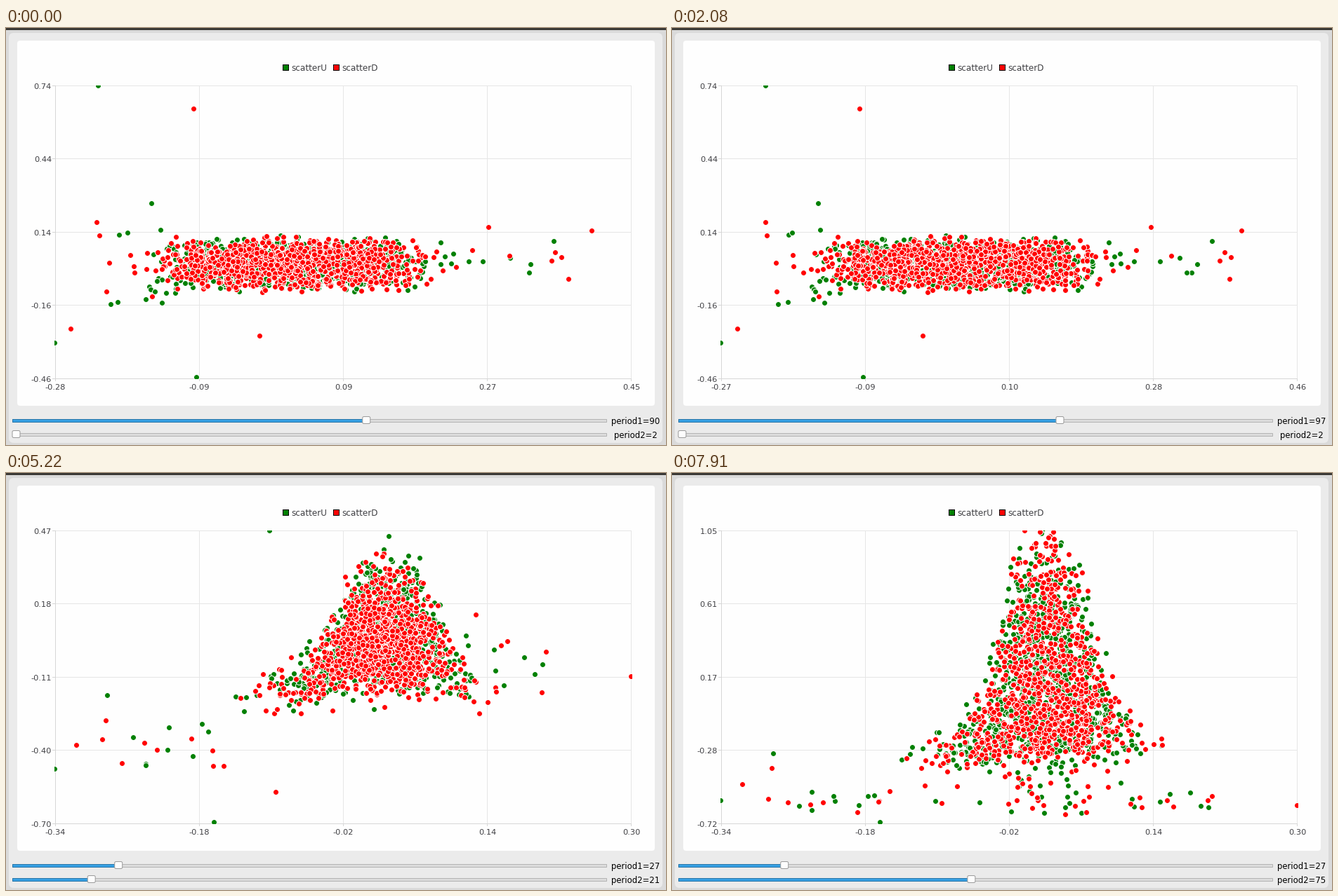
Animation of 940x595 px, one loop 8660 ms. Source, as a matplotlib script:

```python
import numpy as np
import matplotlib.pyplot as plt
from matplotlib.animation import FuncAnimation
from matplotlib.patches import FancyBboxPatch, Rectangle

WIDTH, HEIGHT, DPI = 940, 595, 100
LOOP_MS, INTERVAL = 8660, 20
PT = 72 / DPI
LEFT, RIGHT, TOP, BOTTOM = 70, 890, 82, 500
GREEN, RED = "#008000", "#ff0000"

# Knots of the two periods, with the axis ranges seen at each of them.
KNOTS1, KNOTS2 = [27, 90, 149], [2, 3, 21, 59, 75]
X_LOW, X_HIGH = [-0.34, -0.276, -0.233], [0.30, 0.452, 0.54]
Y_LOW, Y_HIGH = [-0.46, -0.50, -0.696, -0.724, -0.72], [0.74, 0.70, 0.472, 0.886, 1.052]

# Extremes that span the axes: x at period1 = 27, 90, 149, then y at period2 = 2, 3, 21, 59.
UP = [
    (69, 69, 69, 449, 464, 422, 467), (144, 131, 152, 82, 210, 317, 400),
    (199, 173, 153, 292, 82, 417, 455), (296, 271, 280, 498, 498, 498, 498),
    (375, 207, 217, 250, 265, 82, 468),
]
DOWN = [
    (100, 92, 103, 429, 347, 388, 444), (142, 133, 154, 296, 139, 353, 421),
    (310, 267, 264, 115, 270, 418, 454), (384, 361, 331, 439, 431, 455, 471),
    (502, 400, 400, 330, 300, 133, 82), (890, 777, 802, 332, 344, 290, 474),
]

# Moments of change and the slider values that follow them.
k = np.arange(12)
TIMES = np.concatenate([
    [0], np.linspace(150, 1190, 8), np.linspace(1790, 2670, 7),
    4170 + np.floor(2.25 * k + 0.4) * 149.7])
PERIOD1 = np.interp(np.arange(28), [0, 8, 15], [90, 149, 27]).round().astype(int)
PERIOD2 = np.interp(np.arange(28), [15, 16, 19, 23, 27], KNOTS2).round().astype(int)


def hump(x, center, width, power):
    return np.exp(-np.abs((x - center) / width) ** power)


def make_cloud(rng, count):
    """The dense middle: a flat band that grows into a tree shape with period2."""
    wide = rng.random(count) < 0.16
    z = rng.standard_normal(count)
    x27 = np.where(wide, 505 + 78 * z, 530 + 50 * z)
    spread = 0.35 * z + rng.uniform(-1.45, 1.45, count)
    x90 = 405 + 100 * spread + rng.normal(0, 10, count)
    x149 = 402 + 120 * spread + rng.normal(0, 14, count)

    band = 2 * rng.beta(2.6, 2.6, count) - 1
    y2 = 337 + 42 * band
    y3 = 324 + 22 * band + rng.normal(0, 19, count) - 8 * hump(x27, 540, 60, 2)

    shoulder = hump(x27, 520, 130, 4)
    rise = rng.beta(1.2, 2.1, count)
    lift = 0.5 * rise + 0.5 * rng.beta(1.6, 2.1, count)
    y21 = 328 + 0.2 * np.maximum(0, 400 - x27) + rng.normal(0, 11, count)
    y21 -= (40 + 60 * shoulder + 155 * hump(x27, 548, 85, 3)) * lift
    y59 = 385 - 0.06 * (x27 - 530) + rng.normal(0, 8, count)
    y59 -= (25 + 65 * shoulder + 230 * hump(x27, 532, 78, 3)) * rise
    y75 = 1.066 * y59 - 5.4 + rng.normal(0, 5, count)

    sunk = rng.random(count) < 0.025
    y59[sunk] = rng.uniform(405, 485, sunk.sum())
    y75[sunk] = y59[sunk] + 4
    return np.array([x27, x90, x149, y2, y3, y21, y59, y75])


def make_tail(rng, count, x, x90, x149, *levels):
    """Loose dots beside the cloud; ranges for x, (mean, deviation) for each y."""
    xs = [rng.uniform(*limits, count) for limits in (x, x90, x149)]
    ys = [rng.normal(*level, count) for level in levels]
    return np.array(xs + ys + [ys[-1]])


def make_points(extremes, seed):
    """Pixel positions: x for each knot of period1, y for each knot of period2."""
    rng = np.random.default_rng(seed)
    key = np.array(extremes, float).T
    points = np.hstack([
        make_cloud(rng, 950),
        make_tail(rng, 7, (135, 300), (125, 225), (140, 225),
                  (355, 33), (360, 35), (388, 22), (470, 12)),
        make_tail(rng, 7, (650, 790), (640, 860), (630, 850),
                  (328, 22), (322, 20), (270, 45), (468, 9)),
        np.vstack([key, key[-1]]),
    ])
    return points[:3], points[3:]


def blend(value, knots, rows):
    i = min(np.searchsorted(knots, value, "right"), len(knots) - 1)
    f = (value - knots[i - 1]) / (knots[i] - knots[i - 1])
    return rows[i - 1] * (1 - f) + rows[i] * f


fig = plt.figure(figsize=(WIDTH / DPI, HEIGHT / DPI), dpi=DPI, facecolor="#dadada")
ax = fig.add_axes([0, 0, 1, 1])
ax.set(xlim=(0, WIDTH), ylim=(HEIGHT, 0))
ax.axis("off")


def rect(x, y, w, h, color, edge="none", z=1):
    return ax.add_patch(Rectangle((x, y), w, h, fc=color, ec=edge, zorder=z,
                                  lw=0 if edge == "none" else PT))


def rounded(x, y, w, h, radius, color, edge="none", z=1):
    return ax.add_patch(FancyBboxPatch(
        (x, y), w, h, boxstyle=f"round,pad=0,rounding_size={radius}",
        fc=color, ec=edge, lw=PT, zorder=z))


def label(x, y, text="", size=11.4, color="#404044", ha="center"):
    return ax.text(x, y, text, fontsize=size * PT, color=color, ha=ha,
                   va="center_baseline", family="DejaVu Sans", zorder=6)


class Slider:
    def __init__(self, y, name, low):
        self.name, self.low = name, low
        self.track = rect(9, y - 2, 846, 4, "#dcdcdc", "#b4b4b4")
        self.fill = rect(9, y - 2, 1, 4, "#37a0e3", "#2a76a8", 2)
        self.knob = rounded(0, y - 5, 11, 10, 2, "#fdfdfd", "#9b9b9b", 3)
        self.text = label(897, y + 0.5, size=11.6, color="black")

    def set(self, value):
        shift = 6 if value > 99 else 0
        x = 14.5 + (value - self.low) * (835 - shift) / (150 - self.low)
        self.track.set_width(846 - shift)
        self.fill.set_width(x - 9)
        self.knob.set_x(x - 5.5)
        self.text.set_text(f"{self.name}={value}")
        self.text.set_x(897 - shift / 2)


# Window and chart panel
rect(0, 0, WIDTH, 3, "#3b3935")
rounded(4, 7, 931, 585, 7, "#ebebeb")
rounded(16, 18, 908, 521, 4, "#fefefe")

# Grid, axes and tick labels
grid_x = np.linspace(LEFT, RIGHT, 5).round().astype(int)
grid_y = np.linspace(BOTTOM, TOP, 5).astype(int)
for gx, gy in zip(grid_x, grid_y):
    rect(gx, TOP, 1, BOTTOM - TOP, "#e6e6e6")
    rect(LEFT, gy, RIGHT - LEFT + 1, 1, "#e6e6e6")
    rect(gx, BOTTOM, 1, 4, "#d6d6d6")
    rect(LEFT - 4, gy, 4, 1, "#d6d6d6")
rect(LEFT, TOP, 1, BOTTOM - TOP, "#d6d6d6")
rect(LEFT, BOTTOM, RIGHT - LEFT + 1, 1, "#d6d6d6")
x_labels = [label(gx + 0.5, 512.5) for gx in grid_x]
y_labels = [label(65, gy + 1, ha="right") for gy in grid_y]

# Legend
for x, name, color in [(394, "scatterU", GREEN), (466, "scatterD", RED)]:
    rect(x, 52, 9, 9, "black")
    rect(x + 1, 53, 7, 7, color, z=2)
    label(x + 12, 56, name, 12, ha="left")

sliders = Slider(559.5, "period1", 1), Slider(579.5, "period2", 2)

# Series: green first, red above
plot_area = Rectangle((LEFT - 1, TOP), RIGHT - LEFT + 2, BOTTOM - TOP, transform=ax.transData)
series = []
for z, (extremes, color) in enumerate([(UP, GREEN), (DOWN, RED)], 4):
    dots, = ax.plot([], [], "o", ms=8 * PT, mfc=color, mec="white", mew=PT,
                    antialiased=False, zorder=z)
    dots.set_clip_path(plot_area)
    series.append((dots, *make_points(extremes, seed=z)))


def set_ticks(labels, period, knots, lows, highs):
    low, high = np.interp(period, knots, lows), np.interp(period, knots, highs)
    for text, value in zip(labels, np.linspace(low, high, 5)):
        text.set_text(f"{value:.2f}")


def update(frame):
    now = (frame + 1) * INTERVAL - 1
    step = np.searchsorted(TIMES, now, "right") - 1
    period1, period2 = PERIOD1[step], PERIOD2[step]
    sliders[0].set(period1)
    sliders[1].set(period2)
    set_ticks(x_labels, period1, KNOTS1, X_LOW, X_HIGH)
    set_ticks(y_labels, period2, KNOTS2, Y_LOW, Y_HIGH)
    for dots, xs, ys in series:
        dots.set_data(blend(period1, KNOTS1, xs), blend(period2, KNOTS2, ys))
    return [dots for dots, _, _ in series]


anim = FuncAnimation(fig, update, frames=LOOP_MS // INTERVAL, interval=INTERVAL,
                     repeat=True, repeat_delay=0, blit=False)
plt.show()
```
